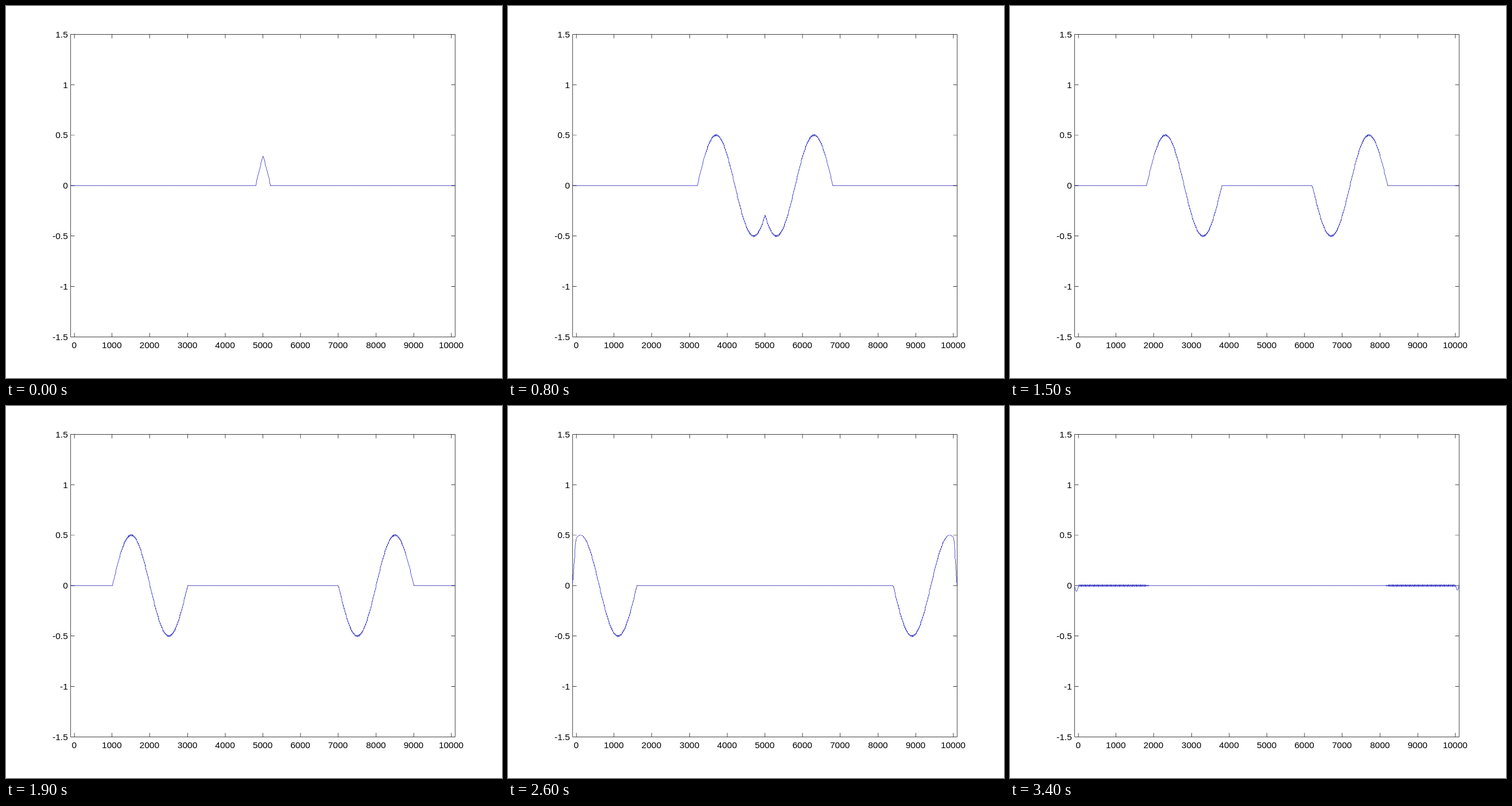
Animation of 864 by 648 pixels, one loop 3500 ms. Source, as an HTML page with a canvas:

```html
<!DOCTYPE html>
<html lang="en">
<head>
<meta charset="utf-8">
<title>Wave pulse</title>
<style>
html, body { margin: 0; width: 100%; height: 100%; overflow: hidden; background: #fff; }
canvas, svg { position: absolute; left: 0; top: 0; display: block; }
text { font: 15.5px "Liberation Sans", Arial, sans-serif; fill: #000; }
</style>
</head>
<body>
<svg id="labels" width="864" height="648"></svg>
<canvas id="plot" width="864" height="648"></canvas>
<script>
const ctx = document.getElementById('plot').getContext('2d');
const labels = document.getElementById('labels');

// The plot is laid out on a 1200 x 900 pixel grid and scaled to the stage.
const SCALE = 0.72;
const BOX = { left: 156, right: 1086, top: 68, bottom: 800 };
const TICK = 9;
const STEP_MS = 100, STEPS = 35;
const SPEED = 200, WAVELENGTH = 2000, CENTER = 5005;
const CELL = 10, LAYER = 100, SIZE = 10000;

const px = x => Math.round(BOX.left + (x + LAYER) * (BOX.right - BOX.left) / (SIZE + 2 * LAYER));
const py = v => Math.round(434 - v * 244);
const clamp = v => Math.max(0, Math.min(1, v));

function addLabel(str, x, y, anchor) {
  const el = document.createElementNS('http://www.w3.org/2000/svg', 'text');
  el.setAttribute('x', x);
  el.setAttribute('y', y);
  el.setAttribute('text-anchor', anchor);
  el.textContent = str;
  labels.appendChild(el);
}

function addLabels() {
  for (let x = 0; x <= SIZE; x += 1000) addLabel(x, px(x) * SCALE, 595.5, 'middle');
  for (let v = -1.5; v <= 1.5; v += 0.5) addLabel(v, 107.8, py(v) * SCALE + 5.7, 'end');
}

function drawAxes() {
  const { left, right, top, bottom } = BOX;
  const width = right - left + 1, height = bottom - top + 1;
  ctx.beginPath();
  ctx.rect(left, top, width, 1);
  ctx.rect(left, bottom, width, 1);
  ctx.rect(left, top, 1, height);
  ctx.rect(right, top, 1, height);
  for (let x = 0; x <= SIZE; x += 1000) {
    ctx.rect(px(x), top, 1, TICK + 1);
    ctx.rect(px(x), bottom - TICK, 1, TICK + 1);
  }
  for (let v = -1; v <= 1; v += 0.5) {
    ctx.rect(left, py(v), TICK + 1, 1);
    ctx.rect(right - TICK, py(v), TICK + 1, 1);
  }
  ctx.fillStyle = '#000';
  ctx.fill();
}

// Grid-scale noise carried by the pulse; s is the distance behind its front.
const ripple = s => s < WAVELENGTH ? 0.0075 * clamp((s - 100) / 150) : 0;

// Absorbing layers damp the field outside 0..SIZE.
function damping(x) {
  const depth = x < 0 ? -x / 105 : (x - SIZE) / LAYER;
  return depth > 0 ? 1 - Math.pow(depth, 1.5) : 1;
}

function field(x, front) {
  const r = Math.abs(x - CENTER);
  const s = front - r;
  let v = 0;
  if (s > 10 && s < WAVELENGTH) {
    v = 0.5 * Math.sin(2 * Math.PI * s / WAVELENGTH) * damping(x);
  }
  if (x >= 0 && x <= SIZE) {
    const sign = (x / CELL) % 2 ? -1 : 1;
    v += sign * (ripple(s) - ripple(front - (SIZE - r)));
  }
  return v;
}

// Adds a stepped line of whole grid pixels to the path.
function pixelLine(x0, y0, x1, y1) {
  const n = Math.max(Math.abs(x1 - x0), Math.abs(y1 - y0), 1);
  for (let i = 0; i <= n; i++) {
    ctx.rect(Math.round(x0 + (x1 - x0) * i / n), Math.round(y0 + (y1 - y0) * i / n), 1, 1);
  }
}

function drawCurve(front) {
  ctx.beginPath();
  let lastX = px(-LAYER), lastY = py(field(-LAYER, front));
  for (let x = -LAYER + CELL; x <= SIZE + LAYER; x += CELL) {
    const nx = px(x), ny = py(field(x, front));
    pixelLine(lastX, lastY, nx, ny);
    lastX = nx;
    lastY = ny;
  }
  ctx.fillStyle = '#1010b8';
  ctx.fill();
}

function draw(step) {
  ctx.setTransform(SCALE, 0, 0, SCALE, 0, 0);
  ctx.clearRect(0, 0, 1200, 900);
  drawAxes();
  drawCurve(SPEED * (step + 1));
}

let shown = -1;
const start = performance.now();
function tick() {
  const step = Math.floor((performance.now() - start) / STEP_MS) % STEPS;
  if (step !== shown) draw(shown = step);
  requestAnimationFrame(tick);
}

addLabels();
tick();
</script>
</body>
</html>
```
